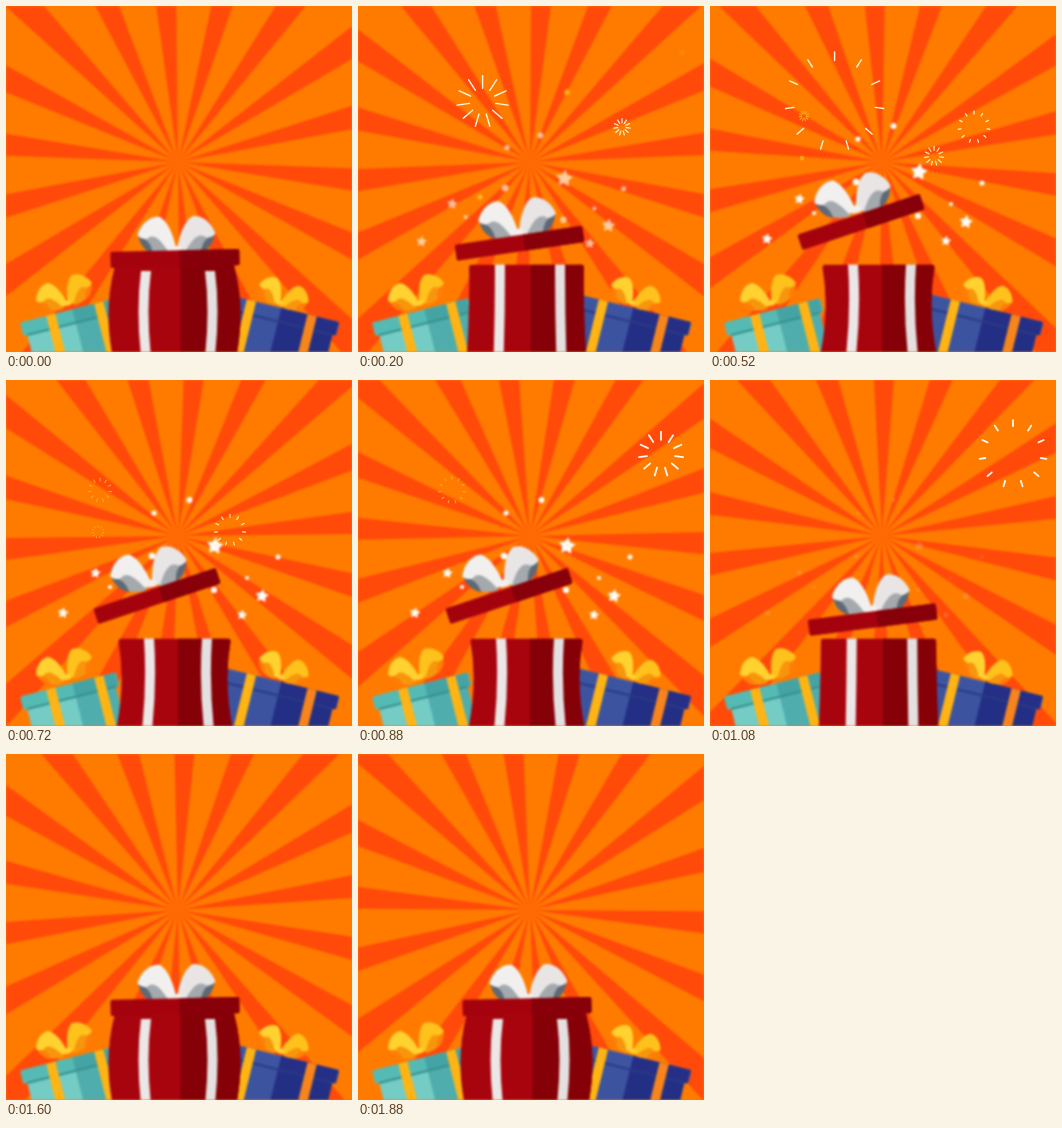
An HTML page with a canvas for the animation above (1920 ms loop, 346x346 px).

```html
<!DOCTYPE html>
<html lang="en">
<head>
<meta charset="utf-8">
<title>Gift box</title>
<style>
  html, body { margin: 0; width: 100%; height: 100%; overflow: hidden; background: #ff7b00; }
  canvas { position: absolute; left: 0; top: 0; width: 346px; height: 346px; }
  #scene { filter: blur(.85px); }
</style>
</head>
<body>
<canvas id="scene" width="346" height="346"></canvas>
<canvas id="sparks" width="346" height="346"></canvas>
<script>
const LOOP = 1920, STEP = 40, SIZE = 346, RAD = Math.PI / 180;
const scene = document.getElementById('scene').getContext('2d');
const sparks = document.getElementById('sparks').getContext('2d');

const clamp = v => Math.max(0, Math.min(1, v));
const span = (t, a, b) => clamp((t - a) / (b - a));
const mix = (a, b, p) => a + (b - a) * p;
const smooth = p => p * p * (3 - 2 * p);
const easeOut = p => 1 - (1 - p) ** 3;

// x, y, size of what flies out of the box
const stars = [[209, 166, 8.8], [256, 216, 7], [57, 233, 5.6], [89.5, 193, 5.4], [236, 235, 5.2]];
const dots = [[183.5, 120, 2.9], [148, 133, 2.6], [146, 176, 3.3], [104, 207, 2.1], [208, 210, 3.1],
  [272, 177, 2.5], [241, 198, 2]];

// x, y, start, length in ms, radius, colour, line width
const bursts = [
  [124.6, 95.5, 80, 560, 50, '#fff6df', 1.4],
  [264, 121, 80, 560, 16, '#fff0cc', 1.3],
  [224, 150, 400, 460, 16, '#ffe9b0', 1.2],
  [94, 110, 440, 560, 13.5, '#ffa81c', 1.1],
  [92, 152, 480, 320, 6, '#ffa81c', 1],
  [303, 74, 760, 400, 34, '#fffaf0', 1.8]
];

// x, y, middle time of golden confetti
const confetti = [[209, 87, 220], [324, 51, 305], [122, 191, 200], [166, 119, 1260],
  [320, 163, 1280], [282, 184, 1280], [322, 231, 1290], [32, 262, 1280]];

function fill(c, color, path) {
  c.fillStyle = color;
  c.fill(typeof path === 'string' ? new Path2D(path) : path);
}

function rect(c, color, x, y, w, h) {
  c.fillStyle = color;
  c.fillRect(x, y, w, h);
}

function at(c, x, y, deg, scale, draw) {
  c.save();
  c.translate(x, y);
  c.rotate(deg * RAD);
  c.scale(scale, scale);
  draw(c);
  c.restore();
}

function rays(t) {
  rect(scene, '#ff7b00', 0, 0, SIZE, SIZE);
  at(scene, 172, 156, -4.3 + 80 * t / LOOP, 1, c => {
    const w = 300 * Math.tan(3.65 * RAD);
    for (let i = 0; i < 18; i++) {
      fill(c, '#ff4a0a', `M0 0L${-w} -300H${w}Z`);
      c.rotate(20 * RAD);
    }
  });
}

function bow(c, { light, shade, inner, deep }) {
  for (const side of [-1, 1]) {
    c.save();
    c.scale(side, 1);
    fill(c, inner, 'M38 -16C28 -24 17 -23 3 -3L8 4C22 5 34 -2 38 -16Z');
    fill(c, deep, 'M38 -16C37 -8 32 -1 24 2C25 -6 28 -13 38 -16Z');
    fill(c, side < 0 ? light : shade,
      'M0 1C2 -14 8 -31 17 -35C28 -36 37 -25 39 -17C37 -14 33 -13 30 -13C24 -18 18 -16 8 1Z');
    c.restore();
  }
  fill(c, light, 'M-5 -4Q0 -7 5 -4L4 2H-4Z');
}

function sideGift(x, y, deg, len, col, split, ribbons) {
  at(scene, x, y, deg, 1, c => {
    rect(c, col.body, 4, 12, len - 8, 90);
    rect(c, col.dark, split, 12, len - 4 - split, 90);
    const lid = new Path2D();
    lid.roundRect(0, 0, len, 14, 2);
    fill(c, col.lid, lid);
    rect(c, col.lidDark, split, 0, len - split - 1, 14);
    rect(c, col.seam, 4, 13, len - 8, 2);
    ribbons.forEach((r, i) => rect(c, col.ribbons[i], r, 0, 9.5, 100));
  });
}

// p runs from closed (bulging) to open (waisted)
function redBody(p) {
  const top = mix(60, 56, p), mid = mix(66, 53, p), low = mix(62, 58.5, p);
  const x = 168.5, y = 258.5;
  const ctrl = 2 * mid - (top + low) / 2;
  const box = new Path2D(`M${x - top + 3} ${y}H${x + top - 3}Q${x + top} ${y} ${x + top} ${y + 3}` +
    `Q${x + ctrl} 303 ${x + low} 350H${x - low}Q${x - ctrl} 303 ${x - top} ${y + 3}` +
    `Q${x - top} ${y} ${x - top + 3} ${y}Z`);
  const c = scene;
  c.save();
  c.clip(box);
  rect(c, '#a8040e', 0, y, SIZE, 100);
  rect(c, '#850007', mix(174.5, 172, p), y, SIZE, 100);
  const a = mix(32, 29, p), m = mix(37, 26, p), b = mix(32, 31, p);
  const start = mix(265, 258, clamp(p * 3)), w = 5;
  for (const s of [-1, 1]) {
    const edge = (o, k) => 172 + s * o + k * w;
    fill(c, s < 0 ? '#ebe7e6' : '#e4e0df',
      `M${edge(a, -1)} ${start}H${edge(a, 1)}Q${edge(m, 1)} 304 ${edge(b, 1)} 350` +
      `H${edge(b, -1)}Q${edge(m, -1)} 304 ${edge(a, -1)} ${start}Z`);
  }
  c.restore();
}

function redLid(p) {
  at(scene, mix(169, 151, p), mix(252.5, 216, p), mix(-1.3, -18.5, p), 1, c => {
    at(c, mix(2, -1, p), mix(-7, -12, p), 6 * p, 1, k => bow(k, silver));
    const lid = new Path2D();
    lid.roundRect(-64.5, -8.2, 129, 16.4, 2);
    fill(c, '#a4030d', lid);
    c.save();
    c.clip(lid);
    rect(c, '#880009', 4.5, -9, 70, 18);
    c.restore();
  });
}

function star(c, r) {
  c.beginPath();
  for (let i = 0; i < 10; i++) {
    const d = i % 2 ? r * .54 : r, a = i * 36 * RAD;
    c.lineTo(d * Math.sin(a), -d * Math.cos(a));
  }
  c.closePath();
  c.fill();
}

function disc(c, x, y, r) {
  c.beginPath();
  c.arc(x, y, r, 0, 7);
  c.fill();
}

function flyers(t) {
  const q = easeOut(span(t, 60, 290)), gone = span(t, 900, 1120);
  const c = scene;
  const place = (x, y) => [mix(165, x, q), mix(200, y, q) + (1 - q) * 75];
  c.globalAlpha = span(t, 60, 280) * (1 - gone);
  c.fillStyle = '#fffaf2';
  for (const [x, y, r] of stars)
    at(c, ...place(x, y), 8 - 20 * (1 - q), 1 - gone * .5, k => star(k, r));
  for (const [x, y, r] of dots) disc(c, ...place(x, y), r * (1 - gone * .5));

  c.fillStyle = '#ffb81e';
  for (const [x, y, mid] of confetti) {
    const u = (t - mid) / 120;
    c.globalAlpha = clamp((1 - Math.abs(u)) * 2);
    disc(c, x, y + u * 5, 2.6);
  }
  c.globalAlpha = 1;
}

function burst(t, [x, y, start, time, radius, color, width]) {
  const p = (t - start) / time;
  if (p <= 0 || p >= 1) return;
  const out = radius * easeOut(p);
  const len = Math.min(out * .5, radius * .28 * (1 - p * .5));
  at(sparks, x, y, 0, 1, c => {
    c.globalAlpha = clamp((1 - p) * 5);
    c.strokeStyle = color;
    c.lineWidth = width;
    c.lineCap = 'round';
    for (let i = 0; i < 11; i++) {
      c.beginPath();
      c.moveTo(0, -out);
      c.lineTo(0, len - out);
      c.stroke();
      c.rotate(2 * Math.PI / 11);
    }
  });
}

const silver = { light: '#f2f0ef', shade: '#e8e5e4', inner: '#a3a9ad', deep: '#5d6975' };
const gold = { light: '#ffd230', shade: '#ffc21c', inner: '#f7960c', deep: '#ff7d08' };
const teal = { body: '#74ccc5', dark: '#4fadad', lid: '#55bab3', lidDark: '#46a3a4', seam: '#36918f',
  ribbons: ['#ffb414', '#ffb414'] };
const blue = { body: '#3c539f', dark: '#232f84', lid: '#3d55a1', lidDark: '#242f85', seam: '#2a3a86',
  ribbons: ['#ffb414', '#f8851c'] };

function draw(t) {
  const open = smooth(span(t, 40, 400)) * (1 - smooth(span(t, 900, 1200)));
  rays(t);
  sideGift(14, 316.5, -14.2, 99, teal, 54, [27, 76.5]);
  at(scene, 62, 298, -18, .75, c => bow(c, gold));
  sideGift(219, 288, 13.8, 118, blue, 58, [22.5, 85]);
  at(scene, 274, 298, 20, .67, c => bow(c, gold));
  redBody(Math.sqrt(open));
  redLid(open);
  flyers(t);
  sparks.clearRect(0, 0, SIZE, SIZE);
  for (const b of bursts) burst(t, b);
}

const begin = performance.now();
function tick() {
  const t = (performance.now() - begin) % LOOP;
  draw(Math.floor(t / STEP) * STEP);
  requestAnimationFrame(tick);
}
tick();
</script>
</body>
</html>
```
